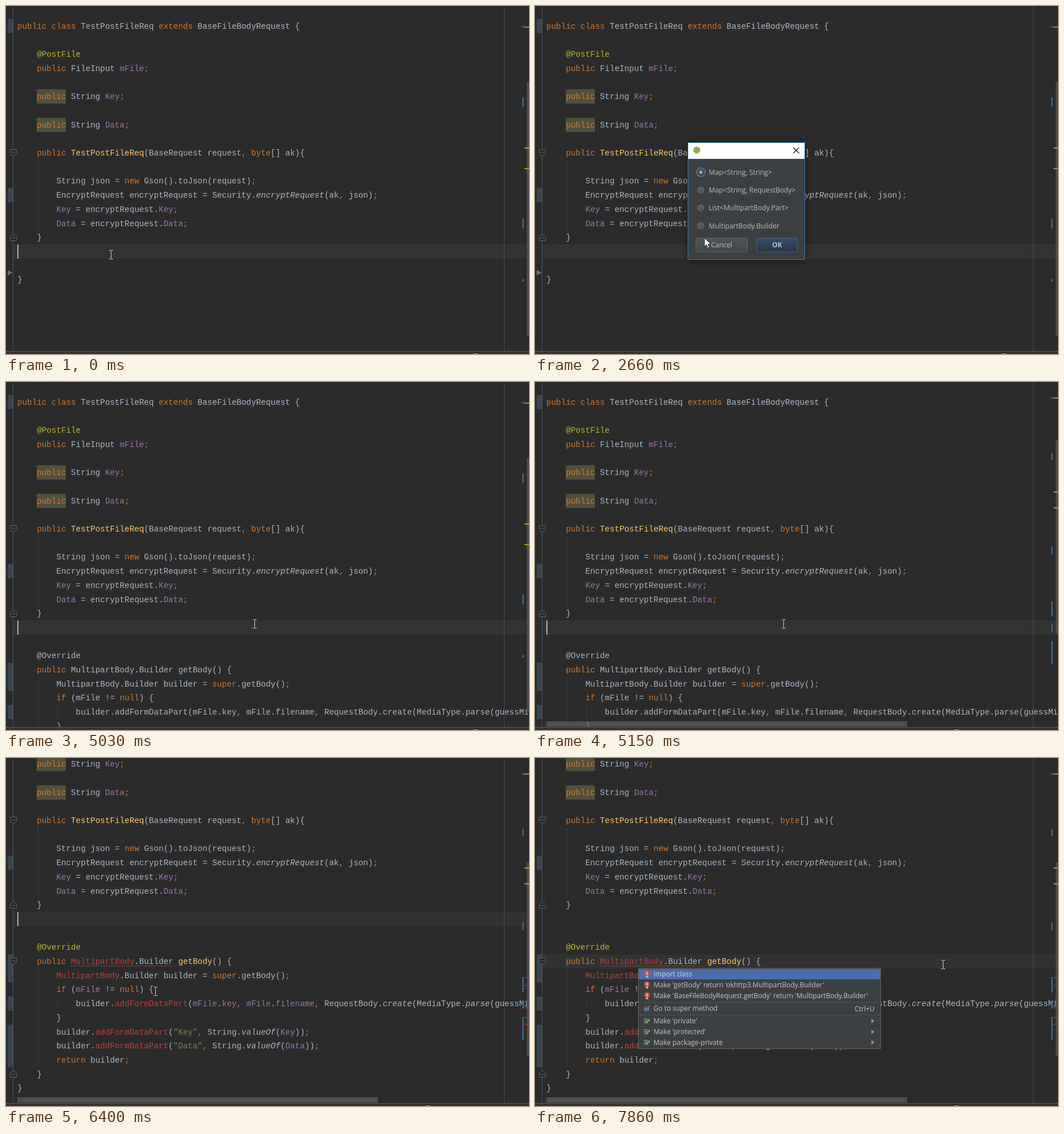
Recreate the animation shown at these times as an HTML page with a canvas. Size 918 by 610 pixels, loop 8000 ms.

```html
<!DOCTYPE html>
<html lang="en">
<head>
<meta charset="utf-8">
<title>Code editor</title>
<style>
html, body { margin: 0; width: 918px; height: 610px; overflow: hidden; background: #2b2b2b; }
canvas { display: block; }
</style>
</head>
<body>
<canvas id="stage" width="918" height="610"></canvas>
<script>
const ctx = document.getElementById('stage').getContext('2d');
const LOOP = 8000, COL = 8.55, ROW = 24.7, LEFT = 20, TOP = 22.7;
const CODE_FONT = '14.25px "Liberation Mono", monospace';
const UI_FAMILY = '"Open Sans", "Noto Sans", sans-serif';
const COLOR = {
  plain: '#a9b7c6', keyword: '#cc7832', field: '#9876aa', method: '#ffc66d',
  note: '#bbb529', error: '#bc3f3c', string: '#6a8759'
};

const head = `public class TestPostFileReq extends BaseFileBodyRequest {

    @PostFile
    public FileInput mFile;

    public String Key;

    public String Data;

    public TestPostFileReq(BaseRequest request, byte[] ak){

        String json = new Gson().toJson(request);
        EncryptRequest encryptRequest = Security.encryptRequest(ak, json);
        Key = encryptRequest.Key;
        Data = encryptRequest.Data;
    }

`.split('\n');
const body = `    @Override
    public MultipartBody.Builder getBody() {
        MultipartBody.Builder builder = super.getBody();
        if (mFile != null) {
            builder.addFormDataPart(mFile.key, mFile.filename, RequestBody.create(MediaType.parse(guessMimeType(
        }
        builder.addFormDataPart("Key", String.valueOf(Key));
        builder.addFormDataPart("Data", String.valueOf(Data));
        return builder;
    }
}`.split('\n');
const shortDoc = [...head, '}'], longDoc = [...head, ...body];

const KEYWORD = /^(public|class|extends|byte|new|if|null|super|return|;|,)$/;
const FIELD = /^(mFile|Key|Data|key|filename)$/;
const ERROR = /^(MultipartBody|addFormDataPart)$/;
const STATIC = /^(valueOf|create|parse)$/;

// [time, shape, x, y]
const pointerKeys = [
  [0, 'beam', 184.5, 436], [300, 'beam', 184.5, 424], [1550, 'arrow', 181, 423],
  [2660, 'arrow', 297, 406], [2780, 'arrow', 326, 387], [2930, 'arrow', 322, 387],
  [3050, 'arrow', 319, 387], [3330, 'arrow', 317, 387], [3480, 'arrow', 325, 394],
  [3600, 'arrow', 334, 404], [3750, 'arrow', 403, 416], [3900, 'arrow', 412, 416],
  [4020, 'arrow', 420, 417], [4330, 'arrow', 429, 419], [4490, 'arrow', 433, 420],
  [4910, 'beam', 436, 424], [5580, 'beam', 392, 428], [5700, 'beam', 349, 432],
  [6400, 'beam', 262, 409], [6520, 'beam', 201, 393], [6670, 'beam', 190, 372],
  [6790, 'beam', 182, 350], [7060, 'beam', 310, 375], [7180, 'beam', 560, 370],
  [7300, 'beam', 716, 362]
];

const between = (t, a, b) => t >= a && t < b;
const rowTop = line => TOP + ROW * line;
const rowMid = line => rowTop(line) + ROW / 2;

function rect(x, y, w, h, fill) {
  ctx.fillStyle = fill;
  ctx.fillRect(x, y, w, h);
}
function poly(points, fill, stroke, width = 1) {
  ctx.beginPath();
  points.forEach(([x, y], i) => i ? ctx.lineTo(x, y) : ctx.moveTo(x, y));
  if (fill) { ctx.closePath(); ctx.fillStyle = fill; ctx.fill(); }
  if (stroke) { ctx.strokeStyle = stroke; ctx.lineWidth = width; ctx.stroke(); }
}
function disc(x, y, r, fill, stroke) {
  ctx.beginPath();
  ctx.arc(x, y, r, 0, Math.PI * 2);
  if (fill) { ctx.fillStyle = fill; ctx.fill(); }
  if (stroke) { ctx.strokeStyle = stroke; ctx.lineWidth = 1; ctx.stroke(); }
}
function roundBox(x, y, w, h, r, fill, stroke) {
  ctx.beginPath();
  ctx.roundRect(x + .5, y + .5, w - 1, h - 1, r);
  ctx.fillStyle = fill;
  ctx.fill();
  ctx.strokeStyle = stroke;
  ctx.lineWidth = 1;
  ctx.stroke();
}
function label(text, x, y, color = '#bbbbbb', size = 12, align = 'left', weight = '') {
  ctx.font = `${weight} ${size}px ${UI_FAMILY}`;
  ctx.textAlign = align;
  ctx.fillStyle = color;
  ctx.fillText(text, x, y);
  ctx.textAlign = 'left';
}
function vertical(from, to, c1, c2) {
  const g = ctx.createLinearGradient(0, from, 0, to);
  g.addColorStop(0, c1);
  g.addColorStop(1, c2);
  return g;
}

function tokenStyle(token, next, line, analysed) {
  if (KEYWORD.test(token)) return ['keyword'];
  if (token[0] === '"') return ['string'];
  if (!analysed) return ['plain'];
  if (token[0] === '@') return ['note'];
  if (FIELD.test(token)) return ['field'];
  if (ERROR.test(token)) return ['error'];
  if (line === 9 && token === 'TestPostFileReq' || line === 19 && token === 'getBody') return ['method'];
  if (STATIC.test(token) || token === 'encryptRequest' && next[0] === '(') return ['plain', 'italic '];
  return ['plain'];
}
function codeLine(text, line, analysed) {
  const tokens = text.match(/"[^"]*"|@?\w+|[;,]|\s+|[^\w\s;,"@]+/g) || [];
  let col = 0;
  tokens.forEach((token, i) => {
    const [color, slant = ''] = tokenStyle(token, tokens[i + 1] || '', line, analysed);
    ctx.font = slant + CODE_FONT;
    ctx.fillStyle = COLOR[color];
    ctx.fillText(token, LEFT + col * COL, Math.round(rowTop(line) + 17));
    col += token.length;
  });
}

function changeBar(from, to) {
  rect(3, rowTop(from), 10, ROW * (to - from), '#374752');
}
function fold(line, dir) {
  const y = Math.round(rowMid(line)) + (dir < 0 ? -.5 : .5);
  poly([[7.5, y - 6 * dir], [18.5, y - 6 * dir], [18.5, y + 1 * dir], [13, y + 6 * dir], [7.5, y + 1 * dir], [7.5, y - 6 * dir]],
    '#2b2b2b', '#606366');
  poly([[10, y - dir], [16, y - dir]], null, '#606366');
}
function wave(x1, x2, y) {
  const points = [];
  for (let x = x1, i = 0; x <= x2; x += 2, i++) points.push([x, y + (i % 2 ? 2 : 0)]);
  poly(points, null, COLOR.error, .8);
}

function drawCode(t, inserted) {
  const scrolled = t >= 6250, clicked = t >= 6940;
  const doc = inserted ? longDoc : shortDoc;
  ctx.save();
  ctx.beginPath();
  ctx.rect(0, 0, 918, 604);
  ctx.clip();
  if (scrolled) ctx.translate(0, -Math.round(ROW * 6));

  const caretLine = clicked ? 19 : 16;
  rect(13, Math.round(rowTop(caretLine)), 905, 25, t < 5580 ? '#323433' : '#323232');
  changeBar(0, 1);
  changeBar(12, 13);
  if (inserted) {
    changeBar(19, 21);
    changeBar(22, 23);
    changeBar(24, 27);
  }
  rect(12, 0, 1, 760, '#555555');
  rect(874, 0, 1, 760, '#4c4e4f');
  rect(56, rowTop(10), 1, ROW * 5, '#393939');
  if (inserted) {
    rect(56, rowTop(20), 1, ROW * 7, '#393939');
    rect(90, rowTop(22), 1, ROW, '#393939');
  }
  [5, 7].forEach(line => rect(54, Math.round(rowTop(line)), 51, 25, '#52503a'));
  doc.forEach((text, line) =>
    codeLine(text, line, line < 18 || t >= 5580 || t >= 5300 && line < 20));

  fold(9, 1);
  fold(15, -1);
  if (t >= 5300) {
    fold(19, 1);
    fold(27, -1);
  }
  if (!inserted) poly([[3, 463], [12, 467.5], [3, 472]], '#6e6e78');
  const hint = between(t, 5700, 6400);
  if (t >= 5300) {
    if (hint) rect(114, 510, 111, 1, COLOR.error);
    wave(hint ? 225 : 114, 293, 511.5);
  }

  const caretOn = t < 580 || between(t, 1110, 1550) || between(t, 4910, 5580) || between(t, 6250, 7860);
  if (caretOn) rect(clicked ? 181.5 : 20, Math.round(rowTop(caretLine)), clicked ? 2 : 1.6, 25, '#d0d0d0');
  if (hint) drawHint();
  ctx.restore();
}

function drawHint() {
  roundBox(8, 459, 212, 24, 2, '#2f678a', '#5a93b3');
  poly([[106, 482], [122, 482], [114, 491]], '#2f678a');
  label('?', 19, 475, '#64b2e6', 11.9);
  label('okhttp3.MultipartBody? Alt+Enter', 29.5, 475, '#d2dce2', 11.85);
}

function drawFrame(t) {
  const grown = t >= 5150;
  const thumb = !grown ? [133, 445] : t < 6250 ? [101, 341] : [183, 340];
  rect(914, thumb[0], 4, thumb[1], '#4b4b4b');
  const blues = grown ? [[124, 13], [288, 14], [384, 27], [425, 14], [454, 40]] : [[160, 17], [373, 17]];
  blues.forEach(([y, h]) => rect(906.5, y, 2, h, '#4076ab'));
  const yellows = grown ? [27, 192, 219.5] : [36, 248, 284];
  yellows.forEach(y => rect(910, y, 8, 2, '#be9117'));
  rect(906.5, grown ? 26 : 34, 2, 4, '#6b6b5c');
  if (!grown) rect(906.5, 479, 2, 4, '#77797a');
  if (t >= 5300) [384, 398, 426, 437, 454, 466].forEach(y => rect(910, y, 8, 1.5, '#b5302d'));
  if (grown) rect(20, 595, 633, 9, 'rgba(110,110,110,.55)');
  rect(0, 604, 918, 6, '#313335');
  rect(0, 605, 918, 1, '#565656');
  rect(grown ? 736 : 820, 609, 8, 1, '#9a9a9a');
}

function radio(x, y, on) {
  if (on) disc(x, y, 8, '#3f6080', '#5781a8');
  disc(x, y, 5.5, vertical(y - 6, y + 6, '#5d6163', '#4c5052'), on ? '#3b4550' : '#696d6f');
  if (on) disc(x, y, 2, '#d8d8d8');
}
function drawDialog(t) {
  ctx.save();
  ctx.shadowColor = 'rgba(0,0,0,.45)';
  ctx.shadowBlur = 12;
  ctx.shadowOffsetY = 2;
  rect(268, 239, 206, 206, '#3c3f41');
  ctx.restore();
  rect(268, 239, 206, 29, '#ffffff');
  ctx.strokeStyle = '#2f7fc4';
  ctx.lineWidth = 1;
  ctx.strokeRect(268.5, 239.5, 205, 205);
  disc(284, 252.5, 6, '#86b14e');
  poly([[453.5, 248], [463.5, 258]], null, '#111111', 1.2);
  poly([[463.5, 248], [453.5, 258]], null, '#111111', 1.2);

  const choice = t < 3200 ? 0 : 3;
  ['Map<String, String>', 'Map<String, RequestBody>', 'List<MultipartBody.Part>', 'MultipartBody.Builder']
    .forEach((text, i) => {
      const y = 291.5 + 31.2 * i;
      radio(291, y, i === choice);
      label(text, 305, Math.round(y + 4.5), '#bbbbbb', 12.1);
    });
  roundBox(282, 406.5, 91, 25, 2, vertical(407, 432, '#4f5456', '#414648'), '#63686a');
  label('Cancel', 327.5, 423, '#bbbbbb', 12, 'center');
  roundBox(389, 406.5, 72, 25, 2, vertical(407, 432, '#374c69', '#263549'), '#4c6384');
  label('OK', 425, 423, '#bbbbbb', 12, 'center', 'bold');
}

const menuIcons = {
  bulb(y) {
    disc(196.5, y - 1.5, 4.8, '#e0523f');
    rect(196, y - 4, 1.5, 5, '#f4d5cf');
    rect(194.5, y + 3, 4, 3, '#b9b9b9');
  },
  override(y) {
    disc(195, y + 1, 3.6, '#31516a', '#5aa0cf');
    disc(195, y + 1, 1.3, '#8fc6e8');
    poly([[200, y + 4], [200, y - 4]], null, '#d65c50', 1.2);
    poly([[198, y - 2], [200, y - 5], [202, y - 2]], '#d65c50');
  },
  pencil(y) {
    [-4, -1, 2].forEach(d => rect(191, y + d, 5 - d / 2, 1, '#b4b4b4'));
    poly([[194, y + 5], [195, y + 1.5], [200, y - 4], [202.5, y - 2], [197, y + 4]], '#63ad55');
  }
};
const menuRows = [
  ['bulb', 'Import class', 379], ['bulb', "Make 'getBody' return 'okhttp3.MultipartBody.Builder'", 398],
  ['bulb', "Make 'BaseFileBodyRequest.getBody' return 'MultipartBody.Builder'", 417],
  ['override', 'Go to super method', 439], ['pencil', "Make 'private'", 461],
  ['pencil', "Make 'protected'", 480], ['pencil', 'Make package-private', 498.5]
];
function drawMenu() {
  rect(181, 368, 426, 142, '#616466');
  rect(182, 369, 424, 140, '#3c3f41');
  rect(182, 370, 424, 18, '#4b6eaf');
  rect(182, 428, 424, 1, '#515355');
  rect(182, 450, 424, 1, '#515355');
  menuRows.forEach(([icon, text, y], i) => {
    menuIcons[icon](y);
    label(text, 208, Math.round(y + 4), i ? '#c4c4c4' : '#d4d8de', 11.95);
    if (icon === 'pencil') poly([[590.5, y - 4], [596, y], [590.5, y + 4]], '#919496');
  });
  label('Ctrl+U', 596, 444, '#c4c4c4', 11.95, 'right');
}

function drawPointer(t) {
  const [, shape, x, y] = pointerKeys.findLast(key => t >= key[0]);
  if (shape === 'arrow') {
    poly([[0, 0], [0, 15], [3.5, 12], [6, 17.5], [8.5, 16.5], [6, 11], [11, 11], [0, 0]]
      .map(([dx, dy]) => [x + .5 + dx, y + .5 + dy]), '#ffffff', '#1a1a1a', .8);
    return;
  }
  const cx = Math.floor(x), cy = Math.round(y);
  rect(cx, cy - 7, 1, 14, '#d4d4d4');
  [-8, 7].forEach(dy => {
    rect(cx - 3, cy + dy, 3, 1, '#d4d4d4');
    rect(cx + 1, cy + dy, 3, 1, '#d4d4d4');
  });
}

function draw() {
  const t = performance.now() % LOOP;
  rect(0, 0, 918, 610, '#2b2b2b');
  drawCode(t, t >= 5030);
  drawFrame(t);
  if (between(t, 1550, 4910)) drawDialog(t);
  if (t >= 7860) drawMenu();
  drawPointer(t);
  requestAnimationFrame(draw);
}
draw();
</script>
</body>
</html>
```
